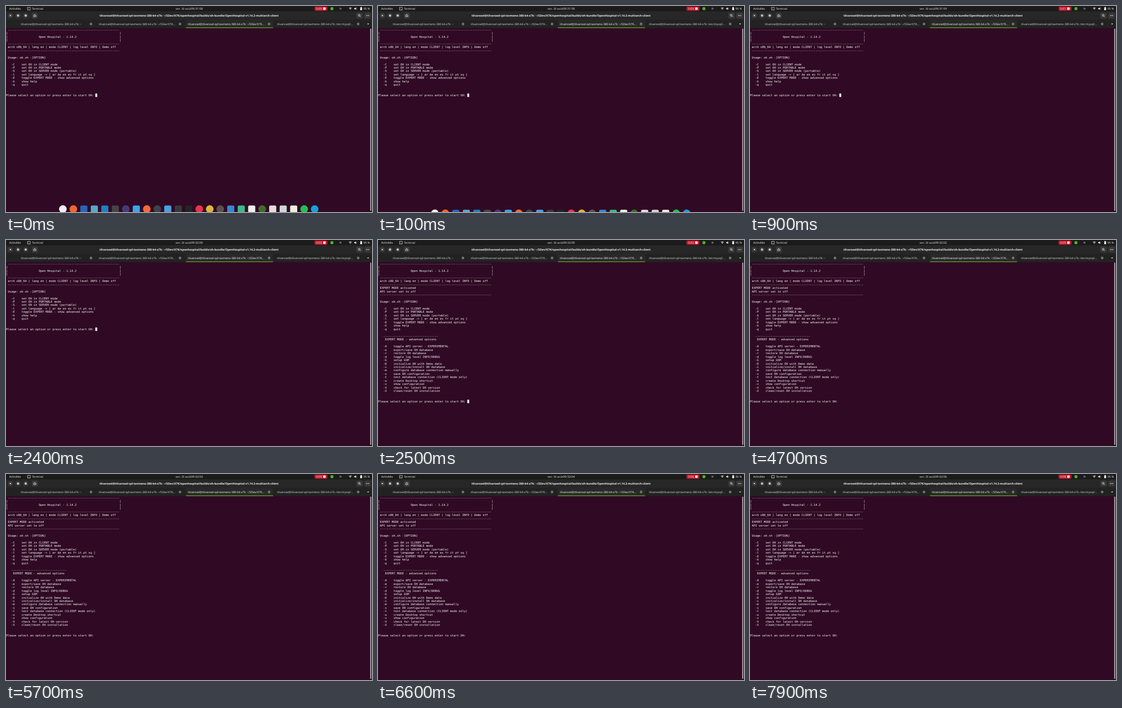
Write an HTML page that moves like this. It is 690x388 px and loops after 8 s.

```html
<!DOCTYPE html>
<html lang="fr">
<head>
<meta charset="utf-8">
<title>Terminal</title>
<style>
  html, body { margin: 0; width: 100%; height: 100%; overflow: hidden; background: #300a24; }
  svg { display: block; width: 690px; height: 388px; }
  text { white-space: pre; text-rendering: geometricPrecision; fill: #f2f2f2; font-family: "Open Sans", "Noto Sans", sans-serif; }
  .term text { font: 5.38px "DejaVu Sans Mono", monospace; fill: #fff; }
</style>
</head>
<body>
<svg id="stage" viewBox="0 0 690 388"></svg>
<script>
const LOOP = 8000;
const ROW = 6.475, COL = 3.239, TOP = 41.8;
const CURSOR_TOGGLES = [200, 900, 2000, 2200, 3000, 3600, 4200, 4800, 5400, 6000, 6600, 7200, 7900];
const EXPERT_AT = 2500;
const DOCK_STEPS = [[0, 0], [100, 8], [200, 20]];

const stage = document.getElementById("stage");

function add(tag, attrs, parent = stage) {
  const node = document.createElementNS("http://www.w3.org/2000/svg", tag);
  for (const key in attrs) node.setAttribute(key, attrs[key]);
  parent.appendChild(node);
  return node;
}
const rect = (x, y, width, height, fill, rx = 0, parent) => add("rect", { x, y, width, height, fill, rx }, parent);
const circle = (cx, cy, r, fill, parent) => add("circle", { cx, cy, r, fill }, parent);
const line = (d, stroke = "#eee", width = 0.8) => add("path", { d, stroke, "stroke-width": width, fill: "none" });
function label(x, y, string, size, attrs = {}) {
  const node = add("text", { x, y, "font-size": size, ...attrs });
  node.textContent = string;
  return node;
}

// Terminal text
const rule = " " + "-".repeat(65);
const side = "|" + " ".repeat(65) + "|";
const header = [
  rule, side, "|" + " ".repeat(18) + "Open Hospital - 1.14.2" + " ".repeat(25) + "|", side, rule,
  " arch x86_64 | lang en | mode CLIENT | log level INFO | Demo off", rule,
];
const option = entry => "   -" + entry[0] + "    " + entry.slice(2);
const basic = [
  "", " Usage: oh.sh -[OPTION]", "",
  ...[
    "C set OH in CLIENT mode",
    "P set OH in PORTABLE mode",
    "S set OH in SERVER mode (portable)",
    "l set language -> [ ar de en es fr it pt sq ]",
    "E toggle EXPERT MODE - show advanced options",
    "h show help",
    "q quit",
  ].map(option),
];
const advanced = [
  "", "   " + "-".repeat(32), "    EXPERT MODE - advanced options", "",
  ...[
    "A toggle API server - EXPERIMENTAL",
    "e export/save OH database",
    "r restore OH database",
    "d toggle log level INFO/DEBUG",
    "G setup GSM",
    "D initialize OH with Demo data",
    "i initialize/install OH database",
    "m configure database connection manually",
    "s save OH configuration",
    "t test database connection (CLIENT mode only)",
    "u create Desktop shortcut",
    "v show configuration",
    "V check for latest OH version",
    "X clean/reset OH installation",
  ].map(option),
];
const prompt = ["", "", "Please select an option or press enter to start OH: "];
const notice = [" EXPERT MODE activated", " API server set to off", rule];

function screen(rows) {
  const group = add("g", { class: "term" });
  rows.forEach((row, i) => {
    if (row) add("text", { x: 0.2, y: TOP + i * ROW + 4.95 }, group).textContent = row;
  });
  return { group, cursorY: TOP + (rows.length - 1) * ROW };
}

rect(0, 0, 690, 388, "#300a24");
const simple = screen([...header, ...basic, ...prompt]);
const expert = screen([...header, ...notice, ...basic, ...advanced, ...prompt]);
const cursor = rect(52 * COL, 0, COL + 0.2, ROW, "#fff");
rect(686.6, 42.5, 2, 343.5, "#b9adb5", 1);

// Top bar
rect(0, 0, 690, 10, "#1b1b1b");
label(6, 7, "Activités", 5.7);
line("M40.5 2.5h5.4v5.2h-5.4z", "#ddd", 0.7);
line("M41.6 4l1.2 1-1.2 1M43.4 6.3h1.5", "#ddd", 0.5);
label(49, 7, "Terminal", 5.2);
label(319.6, 7, "ven. 30 août", 5.05);
const clock = label(348.8, 7, "", 5.6);
rect(581.5, 1, 24.5, 8, "#c7162b", 2.5);
const recording = label(584.5, 7, "", 5.6);
rect(598, 2.8, 4.5, 4.5, "#fff", 0.5);
circle(614.5, 5, 2.9, "#4fb322");
label(629, 7, "fr", 5.4);
add("path", { d: "M646.2 3.4q2.9-2 5.8 0l-2.9 4z", fill: "#999" });
add("path", { d: "M656.5 4h1.3l1.8-1.6v5.2l-1.8-1.6h-1.3z", fill: "#eee" });
line("M660.4 3.5q1 1.5 0 3", "#eee", 0.5);
rect(667.8, 2.4, 3.5, 5.6, "#eee", 0.6);
rect(668.8, 1.6, 1.5, 1, "#eee");
label(674, 7, "95 %", 5.4);

// Window title bar
const user = "tilvarosel@tilvarosel-qd-tavmeno-380-k4-x7k: ";
rect(0, 10, 690, 16, "#272727");
for (const x of [8.3, 22.7, 37.2]) circle(x, 18, 5, "#393939");
line("M7 16.7l2.6 2.6M9.6 16.7l-2.6 2.6", "#fff", 1);
circle(22.7, 18, 2.1, "#eee");
line("M21.5 18h2.4", "#393939", 0.7);
circle(37.2, 18, 2.1, "#eee");
line("M36.2 19l2-2", "#393939", 0.7);
rect(48.5, 12.5, 11.5, 11, "#393939", 2);
line("M52 17v3h4.4v-3M54.2 19v-3.2M53 16.8l1.2-1.2 1.2 1.2", "#eee", 0.8);
label(345, 19.8, user + "~/SDev/X7K/openhospital/builds/oh-bundle/OpenHospital-v1.14.2-multiarch-client", 5.3,
  { "text-anchor": "middle", "font-weight": 700 });
for (const x of [660.5, 675.8]) rect(x, 12.5, 11.8, 11, "#393939", 2);
add("circle", { cx: 665.8, cy: 17.4, r: 1.7, fill: "none", stroke: "#fff", "stroke-width": 0.8 });
line("M667 18.7l1.6 1.6", "#fff", 0.9);
for (const x of [679.5, 681.7, 683.9]) circle(x, 18, 0.7, "#fff");

// Tabs
rect(0, 26, 690, 15.6, "#222");
rect(339, 26, 164.5, 15.6, "#292929");
rect(339, 40.2, 164.5, 1.4, "#5f9b21");
[[28, "~"], [175, "~/SDev/X7K…"], [343, "~/SDev/X7K…"], [511, "/etc/mysql/…"]].forEach(([x, path], i) => {
  label(x, 35.8, user + path, 5.26, { style: i === 2 ? "fill:#fff" : "fill:#dcdcdc" });
  const cx = 160.2 + i * 167.9;
  circle(cx, 33.9, 2.3, "#8b8b8b");
  line(`M${cx - 0.9} 33l1.8 1.8m0-1.8l-1.8 1.8`, "#222", 0.6);
});
add("path", { d: "M680.8 33h3.8l-1.9 2.1z", fill: "#eee" });

// Dock: "o" is round, "s" is square
const dock = add("g", {});
("o#f3eef4 o#f0662b s#2765b5 s#5aa7c8 s#1d80c4 s#454545 o#453a7a s#3aa5e8 o#f26b3a o#3c444a s#4b9fe0 s#363a3d s#20252a " +
 "o#e5374a o#dfb63a o#5c514c s#3686d3 s#39b98b s#eeeeea o#3d6d2b s#e9dcda s#cfd5d8 s#ececdf o#24bf55 o#189fdc")
  .split(" ").forEach((icon, i) => {
    const x = 107.2 + i * 19.78, color = icon.slice(1);
    if (icon[0] === "o") circle(x, 382.5, 7.2, color, dock);
    else rect(x - 6.7, 375.8, 13.4, 13.4, color, 2.5, dock);
  });

const pad = n => String(n).padStart(2, "0");
const show = (node, visible) => node.setAttribute("visibility", visible ? "visible" : "hidden");

function render(t) {
  const second = 31 * 60 + 58 + Math.floor((t + 100) / 1000);
  clock.textContent = `09:${pad(Math.floor(second / 60))}:${pad(second % 60)}`;
  recording.textContent = "0:" + pad(Math.floor((t + 300) / 1000));
  const isExpert = t >= EXPERT_AT;
  show(simple.group, !isExpert);
  show(expert.group, isExpert);
  cursor.setAttribute("y", (isExpert ? expert : simple).cursorY);
  show(cursor, CURSOR_TOGGLES.filter(at => at <= t).length % 2 === 0);
  const [, drop] = DOCK_STEPS.filter(([at]) => at <= t).pop();
  dock.setAttribute("transform", `translate(0 ${drop})`);
}

const start = performance.now();
function tick() {
  render((performance.now() - start) % LOOP);
  requestAnimationFrame(tick);
}
tick();
</script>
</body>
</html>
```
